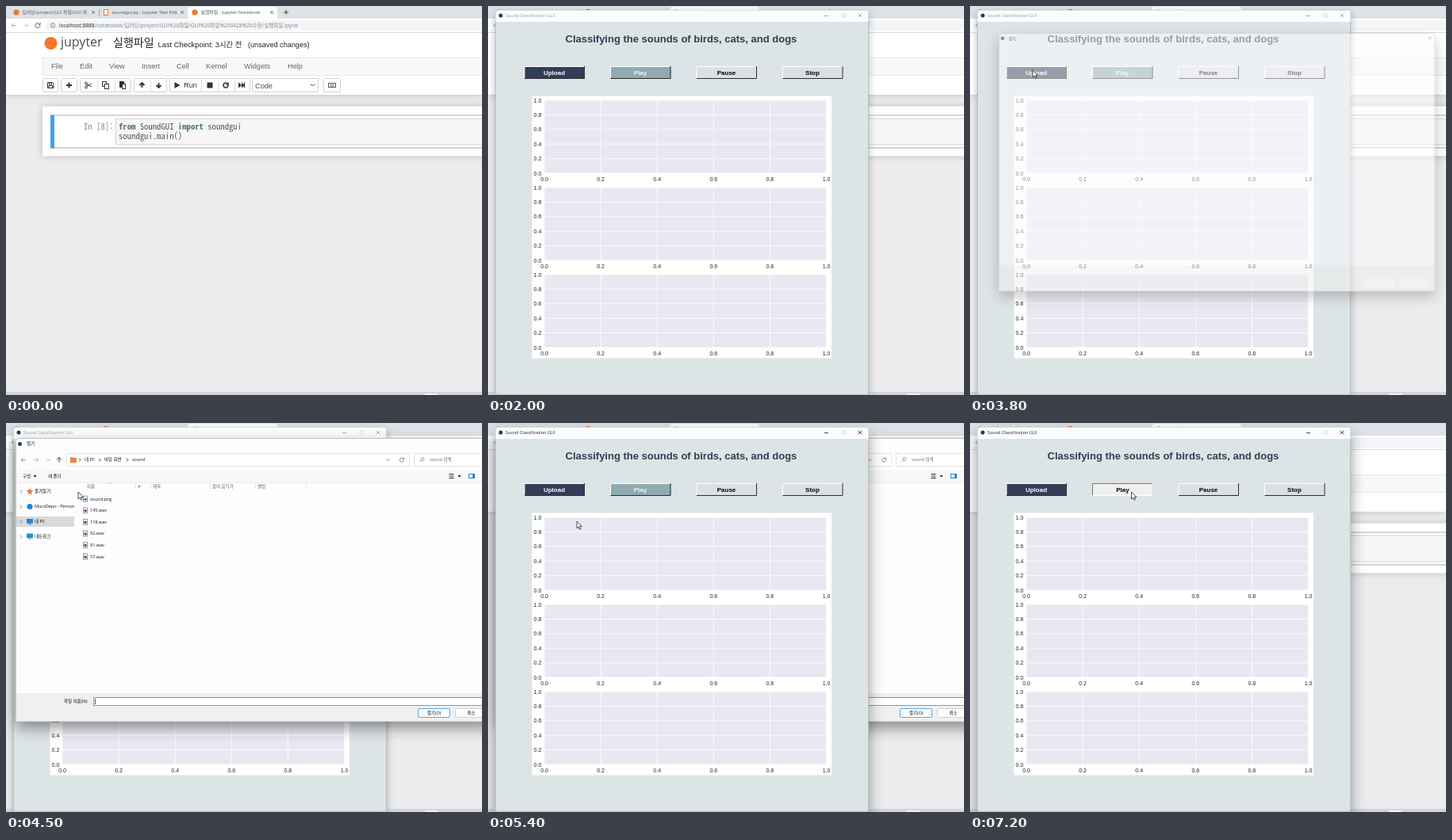
Write an HTML page that moves like this. It is 600 px wide and 491 px high and loops after 8 s.

```html
<!DOCTYPE html>
<html lang="ko">
<head>
<meta charset="utf-8">
<style>
html, body { margin: 0; width: 100%; height: 100%; overflow: hidden; background: #ecebed; }
svg { display: block; width: 600px; height: 491px; }
text { white-space: pre; }
.ui { font-family: "Open Sans", "Noto Sans CJK KR", sans-serif; }
.arial { font-family: "Liberation Sans", "Noto Sans CJK KR", sans-serif; }
.mono { font-family: "Noto Sans Mono CJK KR", monospace; }
.shadow { filter: drop-shadow(0 8px 9px #0006); }
.faint { filter: drop-shadow(0 3px 5px #0004); }
.soft { filter: drop-shadow(0 0 4px #0003); }
</style>
</head>
<body>
<svg id="stage" viewBox="0 0 600 491">
  <g id="browser"></g>
  <g id="app"></g>
  <g id="dialog"></g>
  <path id="cursor" d="M0 0V9L2.1 7.1L3.5 10.2L5 9.5L3.6 6.5H6.4Z" fill="#fff" stroke="#222" stroke-width=".8"/>
</svg>
<script>
const el = id => document.getElementById(id);
const rect = (x, y, w, h, fill, more = '') =>
  `<rect x="${x}" y="${y}" width="${w}" height="${h}" fill="${fill}" ${more}/>`;
const box = (x, y, w, h, fill, edge, more = '') =>
  rect(x + .5, y + .5, w - 1, h - 1, fill, `stroke="${edge}" ${more}`);
const dot = (x, y, r, fill) => `<circle cx="${x}" cy="${y}" r="${r}" fill="${fill}"/>`;
const ring = (x, y, r, color, width) =>
  `<circle cx="${x}" cy="${y}" r="${r}" fill="none" stroke="${color}" stroke-width="${width}"/>`;
const line = (d, color, width = 1) =>
  `<path d="${d}" fill="none" stroke="${color}" stroke-width="${width}"/>`;
const shape = (d, fill) => `<path d="${d}" fill="${fill}"/>`;
// y is the vertical middle of the lettering
const text = (x, y, size, fill, str, cls = 'ui', more = '') =>
  `<text x="${x}" y="${y + size * .36}" font-size="${size}" fill="${fill}" class="${cls}" ${more}>${str}</text>`;
const centred = 'text-anchor="middle"';
const cross = (x, y, r, color, width) =>
  line(`M${x - r} ${y - r}l${2 * r} ${2 * r}m0 ${-2 * r}l${-2 * r} ${2 * r}`, color, width);
const chevron = (x, y, color) => line(`M${x - 1} ${y - 2}l2 2l-2 2`, color, .8);
const arrow = (x, y, angle, color, width) =>
  `<g transform="translate(${x} ${y}) rotate(${angle})">${line('M-3 0H3M0 -3L3 0L0 3', color, width)}</g>`;
const reload = (x, y, r, color, width) =>
  line(`M${x + r} ${y}A${r} ${r} 0 1 1 ${x + r * .5} ${y - r * .85}M${x + r} ${y - r - .5}v${r * .8}h${-r * .8}`, color, width);

function browserMarkup() {
  const ink = '#333', orange = '#f37726', grey = '#5f6368';
  const tabs = [
    [13, '딥러닝/project/GUI 파일/GUI 파', 110],
    [126, 'soundgui.py - Jupyter Text Edit', 222],
    [238, '실행파일 - Jupyter Notebook', 335]];
  const menus = [['File', 57], ['Edit', 93], ['View', 130], ['Insert', 171], ['Cell', 215],
    ['Kernel', 252], ['Widgets', 300], ['Help', 355]];
  const groups = [[46, 20], [69, 21], [93, 65], [161, 42], [206, 102], [310, 84], [400, 22]];
  const code = (y, str) => text(142, y, 10.7, '#555', str, 'mono');
  const keyword = str => `<tspan fill="#4c7d5c" font-weight="bold">${str}</tspan>`;
  return rect(0, 0, 600, 491, '#ecebed')
    + rect(0, 33, 600, 79, '#fff', 'class="soft"')
    + rect(0, 0, 600, 17, '#dee1e6')
    + rect(229, 1, 113, 18, '#fdfdfd', 'rx="4"')
    + tabs.map(([x, label, close], i) =>
        (i === 1 ? box(123, 4, 6, 8, '#fff', orange) : dot(x, 8, 3.6, orange))
        + text(x + 7.5, 8, 5.9, '#555', label) + cross(close, 8, 1.8, '#555', .8)).join('')
    + line('M117.5 4v9', '#a5a8ad') + line('M350 8h6M353 5v6', '#444')
    + rect(0, 16, 600, 17, '#fff') + rect(50, 18, 600, 13, '#f4f5f6', 'rx="6"')
    + line('M0 33.5H600', '#dcdcdc')
    + arrow(10, 24.5, 180, '#aaa', .9) + arrow(25, 24.5, 0, '#ccc', .9) + reload(40, 24.5, 3, grey, 1)
    + ring(59, 24.5, 2.8, grey, .7) + line('M59 24v2M59 22.7v.7', grey, .7)
    + text(67, 24.5, 6.62, '#80868b', '<tspan fill="#222">localhost:8888</tspan>/notebooks/딥러닝/project/GUI%20파일/GUI%20파일%200428%20수정/실행파일.ipynb')
    + dot(56.5, 47, 8, orange)
    + text(69, 45.5, 16, '#4e4e4e', 'jupyter')
    + text(135, 46, 14, '#222', '실행파일', 'arial')
    + text(191.5, 48.3, 9.35, '#222', 'Last Checkpoint: 3시간 전', 'arial')
    + text(305, 48.3, 9.15, '#222', '(unsaved changes)', 'arial')
    + box(46, 65, 600, 23, '#f8f8f8', '#e7e7e7')
    + menus.map(([label, x]) => text(x, 75.5, 9.2, '#666', label, 'arial')).join('')
    + groups.map(([x, w]) => box(x, 91, w, 18, '#fff', '#d2d2d2', 'rx="1"')).join('')
    + line('M115.5 92v16M137.5 92v16M182.5 92v16M246.5 92v16M267.5 92v16M288.5 92v16', '#ddd')
    // save, add, cut, copy, paste
    + line('M52.5 96.5h6l1.5 1.5v5.5h-7.5zM54.5 96.5v2.5h3v-2.5M54 103.5v-3h4.5v3', ink)
    + line('M76 100h7M79.5 96.5v7', ink, 2)
    + line('M100 98l8 4M100 102l8 -4', ink, .9)
    + ring(101, 97.5, 1.5, ink, .9) + ring(101, 102.5, 1.5, ink, .9)
    + box(121, 95, 6, 7, '#fff', ink) + box(124, 98, 6, 7, '#fff', ink)
    + rect(143, 95, 6, 8, ink) + box(146, 98, 5, 7, '#fff', ink)
    + arrow(171.5, 100, -90, ink, 1.8) + arrow(192.5, 100, 90, ink, 1.8)
    + shape('M212.5 96v8l7 -4z', ink) + text(224, 100, 9.2, ink, 'Run', 'arial')
    + rect(253.5, 96.5, 7, 7, ink) + reload(277, 100, 3, ink, 1.6)
    + shape('M293 96.5v7l4 -3.5zM297 96.5v7l4 -3.5z', ink) + rect(300, 96.5, 1.2, 7, ink)
    + text(314, 100.5, 9.2, '#555', 'Code', 'arial') + line('M384 98.5l2.5 2.5l2.5 -2.5', ink)
    + box(406, 97, 10, 6, '#fff', '#555') + line('M408 99.5h6M409 101.2h4', '#555', .8)
    + rect(46, 126.5, 600, 63, '#fff', 'class="soft"')
    + box(56, 137.5, 600, 42, '#fff', '#ababab') + rect(56, 137.5, 5, 42, '#42a1e8')
    + box(138, 141.5, 600, 34, '#f7f6f7', '#d0d0d0')
    + text(98, 152, 10.7, '#858a9e', 'In [<tspan id="prompt">8</tspan>]:', 'mono')
    + code(152, `${keyword('from')} SoundGUI ${keyword('import')} soundgui`)
    + code(164, 'soundgui.main()')
    + rect(0, 487, 600, 4, '#d4d4d5') + rect(528, 489, 16, 2, '#f4f4f4');
}

function button(x, label, fill, color, sunken = false) {
  const [lit, dark] = sunken ? ['#777', '#fff'] : ['#fff', '#2c2c2c'];
  const shift = sunken ? .5 : 0;
  return rect(x, 76, 76, 16, fill)
    + line(`M${x} 91.5V76.5H${x + 76}`, lit) + line(`M${x} 91.5H${x + 75.5}V76`, dark)
    + text(x + 37.5 + shift, 83.7 + shift, 8, color, label, 'arial', `font-weight="bold" ${centred}`);
}

function plot(top) {
  const left = 71, width = 355.5, height = 92;
  let out = rect(left, top, width, height, '#e8e8f2');
  for (let i = 0; i <= 5; i++) {
    const x = left + width * i / 5, y = top + height * (1 - i / 5), label = (i / 5).toFixed(1);
    out += line(`M${x} ${top}v${height}M${left} ${y}h${width}`, '#fff', .8)
      + text(x, top + height + 7, 7, '#262626', label, 'arial', centred)
      + text(67.3, y, 7, '#262626', label, 'arial', 'text-anchor="end"');
  }
  return out;
}

function appMarkup() {
  const columns = [46, 154.5, 263, 371.5];
  return rect(9, 5, 471, 486, '#dde4e6', 'rx="4" id="appFrame"')
    + box(9, 5, 471, 486, '#dde4e6', '#b9bfc1', 'rx="4"')
    + shape('M9.5 20V9a4 4 0 0 1 4 -3.5H476a4 4 0 0 1 3.5 3.5V20z', '#fbfcfd')
    + dot(16, 12, 2.5, '#2b3c55')
    + `<g id="caption">${text(22, 12, 5.5, 'currentColor', 'Sound Classification GUI')
      + line('M424 12.5h5', 'currentColor', .8) + cross(469, 12, 2.3, 'currentColor', .8)}</g>`
    + box(445.5, 9.5, 5, 5, 'none', '#ddd')
    + text(97.5, 41.5, 13, '#343d52', 'Classifying the sounds of birds, cats, and dogs', 'arial', 'font-weight="bold"')
    + rect(55.5, 113.5, 377.5, 331, '#fff')
    + `<g id="blanks">${columns.map(x => rect(x, 76, 76, 16, '#fff')).join('')}</g>`
    + `<g id="buttons">${button(columns[0], 'Upload', '#343d58', '#fff')
      + button(columns[1], 'Play', '#8fabb1', '#f4f8f8')
      + button(columns[2], 'Pause', '#dae0e6', '#000')
      + button(columns[3], 'Stop', '#dae0e6', '#000')}</g>`
    + `<g id="uploadDown">${button(columns[0], 'Upload', '#f0f0f0', '#000', true)}</g>`
    + `<g id="playDown">${button(columns[1], 'Play', '#f0f0f0', '#000', true)}</g>`
    + `<g id="plots">${[119, 229, 339].map(plot).join('')}</g>`;
}

function dialogMarkup() {
  const ink = '#111', grey = '#666', blue = '#1f86d1', size = 5.5;
  const label = (x, y, str, color = ink) => text(x, y, size, color, str);
  const files = ['sound.png', '145.wav', '118.wav', '92.wav', '91.wav', '77.wav'];
  const places = ['즐겨찾기', 'MuroDepo - Persona', '내 PC', '네트워크'];
  const heads = [[102, '이름'], [166, '#'], [185, '제목'], [260, '참여 음악가'], [317, '앨범']];
  const monitor = (y, fill) => rect(26, y - 3.5, 8, 5.5, fill) + rect(28, y + 2.5, 4, 1, fill);
  const placeIcons = [
    shape('M30 82l1.3 2.8l3 .4l-2.2 2.1l.6 3l-2.7 -1.5l-2.7 1.5l.6 -3l-2.2 -2.1l3 -.4z', '#f0783c'),
    dot(30, 105.5, 3.5, blue), monitor(124.5, blue), monitor(143, '#2b8fc4')];
  return rect(12, 19, 604, 358, '#fefdfe', 'rx="4" class="shadow"')
    + box(12, 19, 604, 358, '#fefdfe', '#bfc3c6', 'rx="4"')
    + rect(13, 341, 602, 35.5, '#f0f0f0')
    + rect(519, 360, 41, 12, '#fbfbfb') + rect(566, 360, 41, 12, '#fbfbfb')
    + dot(17.5, 26.5, 2.5, '#2b3c55') + label(26, 26.5, '열기')
    + cross(609, 26, 2.3, grey, .8)
    + `<g id="details">`
    + box(110, 346, 502, 11, '#fff', '#58a6e6')
    + box(519, 360, 41, 12, '#fdfdfd', '#58a6e6', 'rx="1.5"')
    + box(566, 360, 41, 12, '#fdfdfd', '#d0d0d0', 'rx="1.5"')
    + arrow(22, 46.5, 180, '#888', .8) + arrow(38, 46.5, 0, '#aaa', .8)
    + line('M51.5 45.5l2 2l2 -2', '#888', .8) + arrow(67, 46.5, -90, ink, .8)
    + box(76, 38, 433, 17, '#fff', '#e3e3e3') + box(514, 38, 98, 17, '#fff', '#e3e3e3')
    + shape('M81 43h3l1 1h4v6h-8z', '#f0843f')
    + [[99, '내 PC'], [124, '바탕 화면'], [159, 'sound']].map(([x, s]) =>
        chevron(x - 6, 46.5, ink) + label(x, 46.5, s)).join('')
    + line('M479.5 45.5l2 2l2 -2', grey, .8) + reload(499, 46.5, 2.5, grey, .8)
    + ring(525, 45.5, 2, '#777', .7) + line('M523.5 47l-2 2', '#777', .7)
    + label(534, 46.5, 'sound 검색', grey)
    + rect(13, 59, 602, 16, '#f8f8f8') + line('M13 75.5H615', '#ececec')
    + label(21, 67, '구성') + shape('M34.5 66h4l-2 2.5z', ink) + label(53, 67, '새 폴더')
    + line('M558.5 64.5h6M558.5 67h6M558.5 69.5h6', ink, .9) + shape('M569.5 66h4l-2 2.5z', ink)
    + box(583, 64, 8, 6, '#fff', blue) + rect(588, 64, 3, 6, blue)
    + line('M129 76.5l1.5 -1.5l1.5 1.5', '#999', .6)
    + heads.map(([x, s]) => label(x, 80, s, '#5a6a7c')).join('')
    + line('M163.5 76v8M182.5 76v8M257.5 76v8M314.5 76v8M378.5 76v8', '#e5e5e5')
    + rect(13, 118, 73, 13, '#d9d9d9')
    + `<svg x="0" y="76" width="86" height="90" viewBox="0 76 86 90">`
    + places.map((s, i) => {
        const y = 86.5 + 19 * i;
        return chevron(19, y, grey) + placeIcons[i] + label(36, y, s);
      }).join('') + `</svg>`
    + `<g id="files">`
    + `<rect id="row" x="93" y="118" width="285" height="14"/>`
    + files.map((name, i) => {
        const y = 95.7 + 14.6 * i;
        return box(97, y - 4, 6, 8, '#fff', '#999') + dot(100, y + .5, 1.8, i ? '#7d4560' : blue)
          + label(106, y, name);
      }).join('')
    + `</g>`
    + label(73, 351.5, '파일 이름(N):') + line('M112.5 348v7', ink, .7)
    + `<g id="fileName">${label(113.5, 351.5, '118.wav')}</g>`
    + text(539.5, 366, size, ink, '열기(O)', 'ui', centred) + text(586.5, 366, size, ink, '취소', 'ui', centred)
    + `</g>`;
}

el('browser').innerHTML = browserMarkup();
el('app').innerHTML = appMarkup();
el('dialog').innerHTML = dialogMarkup();

const progress = (t, from, to) => Math.min(1, Math.max(0, (t - from) / (to - from)));
const smooth = p => p * p * (3 - 2 * p);
const mix = (a, b, p) => a + (b - a) * p;
const show = (id, on) => el(id).style.display = on ? '' : 'none';
function pose(id, cx, cy, scale, opacity) {
  el(id).setAttribute('transform', `translate(${cx} ${cy}) scale(${scale}) translate(${-cx} ${-cy})`);
  el(id).style.opacity = opacity;
}

function cursorAt(t) {
  if (t < 4500) {
    const p = smooth(progress(t, 2400, 3000)), r = 1 - p;
    return [mix(567, 79, p), 163 * r * r + 36 * p * r + 81 * p * p];
  }
  if (t < 6300) {
    const p = smooth(progress(t, 4500, 4900));
    return [mix(91, 112, p), mix(87, 124, p)];
  }
  const p = smooth(progress(t, 6300, 7100));
  return [mix(112, 203.5, p), mix(124, 87, p)];
}

function render(t) {
  const raised = t >= 5400;
  const order = raised ? ['dialog', 'app', 'cursor'] : ['app', 'dialog', 'cursor'];
  el('stage').append(...order.map(el));

  el('prompt').textContent = t < 800 ? '8' : '*';

  const opening = (1 - progress(t, 1400, 1700)) ** 3;
  show('app', t >= 1500);
  pose('app', 217, 247, 1 - .19 * opening, 1 - .5 * opening);
  show('blanks', t < 1700);
  show('buttons', t >= 1700);
  show('plots', t >= 1800);
  show('uploadDown', t >= 3300 && t < 3500);
  show('playDown', t >= 7200);
  const active = raised || (t >= 3300 && t < 3700);
  el('caption').style.color = active ? '#222' : '#969a9d';
  el('appFrame').setAttribute('class', active ? 'shadow' : 'faint');

  const entering = (1 - progress(t, 3600, 4000)) ** 2;
  const leaving = progress(t, 5400, 5700);
  show('dialog', t >= 3700 && t < 5700);
  pose('dialog', 282, 187, 1 - .356 * entering - .1 * leaving, Math.max(0, 1 - 2 * entering) * (1 - leaving));
  show('details', t >= 4000);
  show('files', t >= 4100);
  show('fileName', t >= 5000 && !raised);
  el('row').setAttribute('fill', t < 4800 || raised ? 'none' : t < 5000 ? '#e8f3fc' : '#cce6fa');

  show('cursor', t >= 2400);
  el('cursor').setAttribute('transform', `translate(${cursorAt(t)})`);
}

let shown = -1;
function tick(now) {
  const t = Math.floor(now % 8000 / 100) * 100;
  if (t !== shown) render(shown = t);
  requestAnimationFrame(tick);
}
render(0);
requestAnimationFrame(tick);
</script>
</body>
</html>
```
